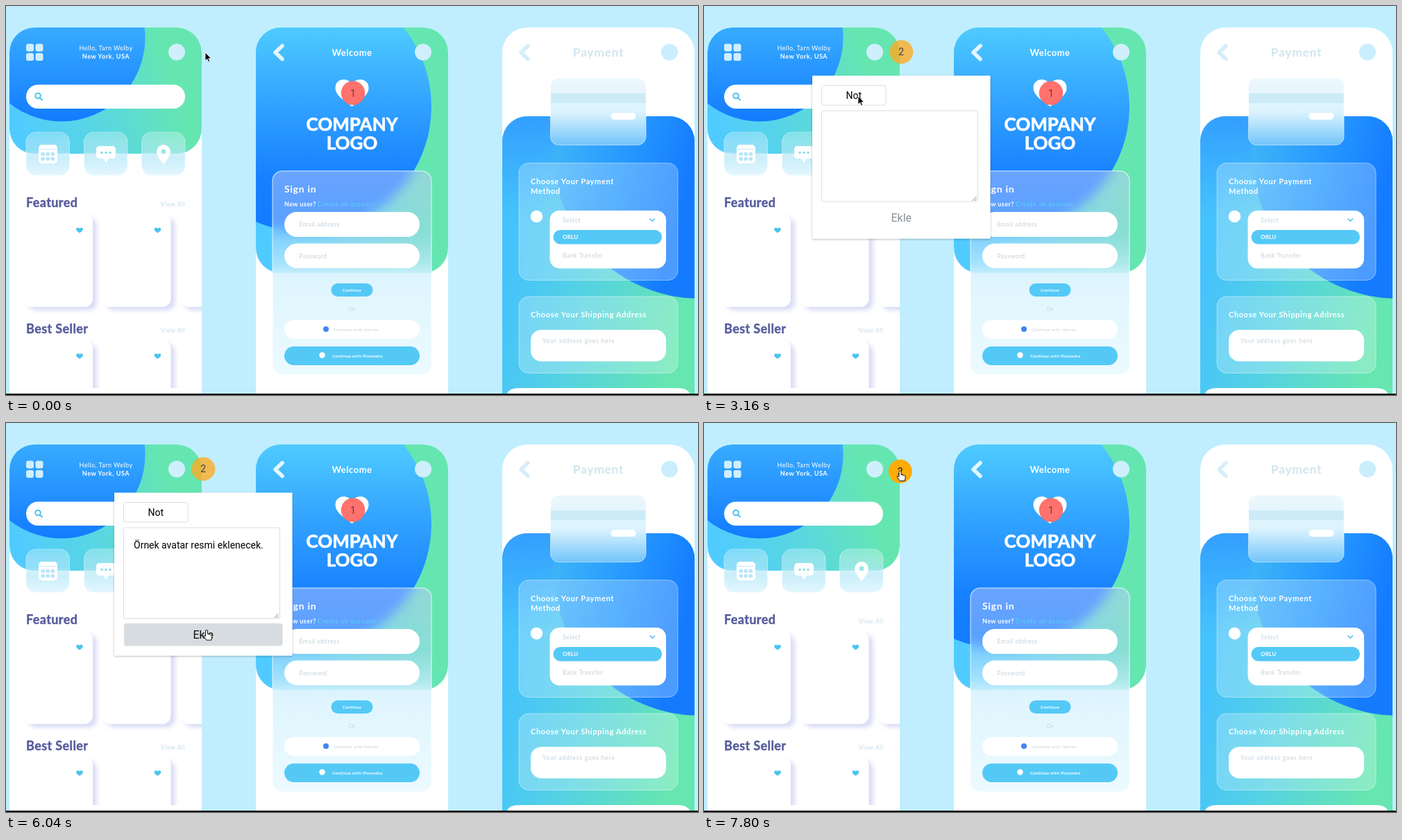
These frames come from a looping animation (997 px wide and 561 px high, 8000 ms). An HTML page:

```html
<!DOCTYPE html>
<html lang="tr">
<head>
<meta charset="utf-8">
<title>Yorum ve not ekleme</title>
<style>
html, body { margin: 0; width: 100%; height: 100%; overflow: hidden; background: #c0eefe; }
svg { display: block; width: 100vw; height: 100vh; }
text { font-family: Lato, "Open Sans", sans-serif; white-space: pre; }
.b { font-weight: 700; }
.ui text, text.ui { font-family: Roboto, Arial, sans-serif; font-size: 14px; }
.mid { text-anchor: middle; }
.head { font-size: 18px; letter-spacing: .4px; fill: #555c9c; stroke: #555c9c; stroke-width: .4; }
.link { font-size: 8.5px; letter-spacing: .6px; fill: #c3dcea; }
.hint { font-size: 8.5px; letter-spacing: .55px; fill: #c3cfd8; }
.ask { font-size: 11px; letter-spacing: .68px; fill: #fff; }
.tiny { font-size: 6.2px; letter-spacing: .25px; }
.glass { fill: #fff; fill-opacity: .24; stroke: #fff; stroke-opacity: .42; }
.white { fill: #fff; }
.pale { fill: #d0effc; }
.sky { fill: #54c9f6; }
</style>
</head>
<body>
<svg viewBox="0 0 997 561" preserveAspectRatio="none">
<defs>
  <linearGradient id="base" x1="0" x2="1" y1=".6" y2=".4">
    <stop offset="0" stop-color="#50cbff"/><stop offset=".5" stop-color="#5bd9db"/><stop offset=".85" stop-color="#65e6b1"/>
  </linearGradient>
  <linearGradient id="disc1" gradientUnits="userSpaceOnUse" x1="0" x2="0" y1="31" y2="166">
    <stop offset="0" stop-color="#38abff"/><stop offset="1" stop-color="#137bff"/>
  </linearGradient>
  <linearGradient id="disc2" gradientUnits="userSpaceOnUse" x1="0" x2="0" y1="31" y2="320">
    <stop offset="0" stop-color="#4ecbff"/><stop offset=".35" stop-color="#34a5ff"/><stop offset=".75" stop-color="#1680ff"/><stop offset="1" stop-color="#147bff"/>
  </linearGradient>
  <linearGradient id="disc3" gradientUnits="userSpaceOnUse" x1="788" x2="975" y1="240" y2="290">
    <stop offset="0" stop-color="#3db2f8"/><stop offset=".5" stop-color="#2698ff"/><stop offset="1" stop-color="#147bff"/>
  </linearGradient>
  <linearGradient id="base3" gradientUnits="userSpaceOnUse" x1="715" x2="975" y1="390" y2="450">
    <stop offset="0" stop-color="#45c2fc"/><stop offset=".45" stop-color="#55d2e2"/><stop offset="1" stop-color="#66e6b0"/>
  </linearGradient>
  <linearGradient id="fade3" gradientUnits="userSpaceOnUse" x1="0" x2="0" y1="159" y2="300">
    <stop offset="0" stop-color="#339fff"/><stop offset="1" stop-color="#339fff" stop-opacity="0"/>
  </linearGradient>
  <linearGradient id="tile" x1="0" x2="0" y1="0" y2="1">
    <stop offset="0" stop-color="#fff" stop-opacity=".24"/><stop offset=".42" stop-color="#b9eaf6" stop-opacity=".6"/>
    <stop offset=".62" stop-color="#c9eefa" stop-opacity=".95"/><stop offset="1" stop-color="#e4f7fe"/>
  </linearGradient>
  <linearGradient id="frost" gradientUnits="userSpaceOnUse" x1="0" x2="0" y1="238" y2="532">
    <stop offset="0" stop-color="#c3c8ff" stop-opacity=".48"/><stop offset=".3" stop-color="#bcd6ff" stop-opacity=".4"/>
    <stop offset=".45" stop-color="#c9ecfd" stop-opacity=".7"/><stop offset=".54" stop-color="#dff5fe"/><stop offset="1" stop-color="#ecfaff"/>
  </linearGradient>
  <linearGradient id="pay" x1="0" x2="0" y1="0" y2="1">
    <stop offset="0" stop-color="#edf8fd"/><stop offset=".5" stop-color="#dcf3fd"/>
    <stop offset=".62" stop-color="#c4e9fd"/><stop offset="1" stop-color="#72c4fb"/>
  </linearGradient>
  <filter id="blur" x="-20%" y="-20%" width="140%" height="140%"><feGaussianBlur stdDeviation="8"/></filter>
  <filter id="soft" x="-20%" y="-20%" width="150%" height="150%"><feDropShadow dx="6" dy="5" stdDeviation="3" flood-color="#d9dcf6"/></filter>
  <filter id="drop" x="-10%" y="-10%" width="120%" height="120%"><feDropShadow dx="0" dy="1" stdDeviation="1.5" flood-opacity=".3"/></filter>
  <path id="body" d="M0 559V67A36 36 0 0 1 36 31H241A36 36 0 0 1 277 67V559Z"/>
  <clipPath id="body1"><use href="#body" x="5"/></clipPath>
  <clipPath id="top1"><rect x="5" y="31" width="277" height="182" rx="36"/></clipPath>
  <clipPath id="top2"><rect x="360" y="31" width="277" height="354" rx="36"/></clipPath>
  <clipPath id="low3"><path d="M715 559V195A36 36 0 0 1 751 159H956A36 36 0 0 1 992 195V559Z"/></clipPath>
  <clipPath id="form"><rect x="384" y="238" width="229" height="294" rx="14"/></clipPath>
  <clipPath id="row"><rect x="5" y="280" width="277" height="271"/></clipPath>
  <path id="heart" d="M0 20C-8 13-24 5-24-7C-24-21-6-23 0-12C6-23 24-21 24-7C24 5 8 13 0 20Z"/>
  <path id="back" d="M5-9.500L-5 0L5 9.500" fill="none" stroke-width="5.500" stroke-linecap="round" stroke-linejoin="round"/>
</defs>

<rect width="997" height="561" fill="#c0eefe"/>

<!-- home -->
<g clip-path="url(#body1)">
  <use href="#body" x="5" class="white"/>
  <g clip-path="url(#top1)">
    <rect x="5" y="31" width="277" height="182" fill="url(#base)"/>
    <circle cx="80" cy="46" r="120.500" fill="url(#disc1)"/>
  </g>
  <g id="grid" class="pale"></g>
  <text class="mid white" x="144" y="63.500" font-size="9" letter-spacing=".45">Hello, Tarn Welby</text>
  <text class="mid white b" x="144" y="76" font-size="9" letter-spacing=".6">New York, USA</text>
  <circle class="pale" cx="246" cy="66.500" r="12"/>
  <rect class="white" x="29" y="113.500" width="229" height="34.500" rx="17"/>
  <g fill="none" stroke="#4cc3ee" stroke-width="2" stroke-linecap="round"><circle cx="46" cy="129.500" r="3.800"/><path d="M49 132.500l3 3"/></g>
  <g id="tiles" fill="url(#tile)" stroke="#fff" stroke-opacity=".4"></g>
  <rect class="white" x="47" y="200" width="27" height="27" rx="5"/>
  <path d="M49 206.500H72" stroke="#c5ebfa" stroke-width="1"/>
  <g id="days" fill="#b9e6f8"></g>
  <path class="white" d="M135 202h18q5 0 5 5v8q0 5-5 5h-5l-4 6-4-6h-5q-5 0-5-5v-8q0-5 5-5z"/>
  <g fill="#8fdce9"><circle cx="138" cy="211.500" r="1.800"/><circle cx="144" cy="211.500" r="1.800"/><circle cx="150" cy="211.500" r="1.800"/></g>
  <path class="white" fill-rule="evenodd" d="M227 228q-10-11-10-18a10 10 0 0 1 20 0q0 7-10 18zM223.500 210a3.500 3.500 0 0 0 7 0a3.500 3.500 0 0 0-7 0z"/>
  <text class="head b" x="29" y="290">Featured</text>
  <text class="link" x="223" y="289">View All</text>
  <g id="cards" class="white" clip-path="url(#row)"></g>
  <text class="head b" x="29" y="471.500">Best Seller</text>
  <text class="link" x="223" y="470.500">View All</text>
  <g id="likes" fill="#48c4ee"></g>
</g>

<!-- sign in -->
<use href="#body" x="360" class="white"/>
<g clip-path="url(#top2)">
  <rect x="360" y="31" width="277" height="354" fill="url(#base)"/>
  <circle cx="432" cy="145" r="181" fill="url(#disc2)"/>
</g>
<use href="#back" x="393" y="67" stroke="#e4f6ff"/>
<text class="mid white b" x="498.500" y="72" font-size="13" letter-spacing=".5">Welcome</text>
<circle class="pale" cx="601" cy="66.500" r="12"/>
<use href="#heart" x="498.500" y="125" class="white"/>
<g class="mid white b" font-size="26" stroke="#fff" stroke-width=".7" stroke-linejoin="round">
  <text x="498.500" y="179.500">COMPANY</text><text x="498.500" y="207">LOGO</text>
</g>
<g clip-path="url(#form)">
  <rect x="360" y="31" width="277" height="354" fill="url(#base)"/>
  <circle cx="432" cy="145" r="181" fill="url(#disc2)" filter="url(#blur)"/>
  <rect x="384" y="238" width="229" height="294" fill="url(#frost)"/>
</g>
<rect x="384" y="238" width="229" height="294" rx="14" fill="none" stroke="#fff" stroke-opacity=".55" stroke-width="1.500"/>
<text class="white b" x="401" y="269" font-size="14" letter-spacing=".7">Sign in</text>
<text class="white b" x="401" y="288.500" font-size="9" letter-spacing=".4">New user?</text>
<text x="449" y="288.500" font-size="9" letter-spacing=".7" fill="#54d8ec">Create an account</text>
<rect class="white" x="401" y="297" width="195" height="36" rx="18"/>
<rect class="white" x="401" y="342.500" width="195" height="35.500" rx="18"/>
<text class="hint" x="422.500" y="318">Email address</text>
<text class="hint" x="422.500" y="363.500">Password</text>
<rect class="sky" x="468.500" y="400" width="60" height="19" rx="9.500"/>
<text class="tiny mid white b" x="498.500" y="412">Continue</text>
<text class="mid" x="498.500" y="440" font-size="8" fill="#c3d3dc">Or</text>
<rect class="white" x="401" y="453" width="195" height="27" rx="13.500"/>
<circle cx="461" cy="466" r="4" fill="#4285f4"/>
<text class="tiny" x="472" y="468.500" fill="#c6d0d8">Continue with Norvex</text>
<rect class="sky" x="401" y="491" width="195" height="27" rx="13.500"/>
<circle class="white" cx="455.500" cy="503.500" r="4.200"/>
<text class="tiny white b" x="470" y="506.500">Continue with Plumedra</text>

<!-- payment -->
<use href="#body" x="715" class="white"/>
<use href="#back" x="747" y="67" stroke="#d6eefa"/>
<text class="mid b" x="853.500" y="73" font-size="17.500" letter-spacing=".7" fill="#d0e6ee">Payment</text>
<circle cx="956" cy="66.500" r="12" fill="#caeefc"/>
<g clip-path="url(#low3)">
  <rect x="715" y="159" width="277" height="400" fill="url(#base3)"/>
  <rect x="715" y="159" width="277" height="141" fill="url(#fade3)"/>
  <circle cx="1000" cy="210" r="212" fill="url(#disc3)"/>
</g>
<rect x="784.500" y="104" width="137.500" height="96.500" rx="12" fill="url(#pay)" stroke="#fff" stroke-opacity=".5"/>
<rect x="785" y="126" width="136.500" height="14" fill="#cdebf7"/>
<rect class="white" x="871.500" y="154" width="36" height="10" rx="5"/>
<rect class="glass" x="739" y="226.500" width="229" height="169" rx="14"/>
<text class="ask b" x="756" y="257">Choose Your Payment</text>
<text class="ask b" x="756" y="270.500">Method</text>
<circle class="white" cx="764.500" cy="303.500" r="8.700"/>
<rect class="white" x="783.500" y="295" width="167.500" height="83.500" rx="14"/>
<text class="hint" x="802" y="311.500">Select</text>
<path d="M927.500 306.500l3.700 3.700 3.700-3.700" fill="none" stroke="#4cbce8" stroke-width="1.500"/>
<rect class="sky" x="788.500" y="323" width="156.500" height="20.500" rx="10"/>
<text class="white b" x="802" y="336.300" font-size="8" letter-spacing=".2">ORLU</text>
<text class="hint" x="802" y="363">Bank Transfer</text>
<rect class="glass" x="739" y="419" width="229" height="110.500" rx="14"/>
<text class="ask b" x="756" y="449">Choose Your Shipping Address</text>
<rect class="white" x="756" y="467" width="195" height="45.500" rx="15"/>
<text class="hint" x="773" y="485.500" letter-spacing=".85" style="letter-spacing:.85px">Your address goes here</text>
<path class="white" d="M722 559q3-8 17-8H968q14 0 17 8z"/>
<rect y="559" width="997" height="2" fill="#0b0f12"/>

<!-- comment layer -->
<g class="ui">
  <g transform="translate(500 125.500)" opacity=".95"><circle r="17.300" fill="#ff6b66"/><text class="mid" y="5" fill="#6b2e30">1</text></g>
  <g id="pin"><circle r="17" id="dot"/><text class="mid" y="5" fill="#111">2</text></g>
  <g id="popup">
    <rect class="white" x="156" y="100.500" width="256.500" height="235" filter="url(#drop)"/>
    <rect x="169.500" y="114.500" width="92.500" height="28.500" rx="3" fill="#fff" stroke="#d9dcdf"/>
    <text class="mid" id="kind" x="215.800" y="134"></text>
    <rect x="169.500" y="151" width="225" height="131" rx="2" fill="#fff" stroke="#d9dcdf"/>
    <path d="M386.500 281l6-6M390 281l2.500-2.500" stroke="#666" stroke-width=".8"/>
    <text id="note" x="184" y="180.500"></text>
    <rect id="caret" y="167.500" width="1" height="16" fill="#111"/>
    <path id="edges" d="M171 291V312M397.500 291V312" stroke="#e9ebec"/>
    <rect id="hover" x="170" y="289" width="228.500" height="32.500" rx="4" fill="#d6dcdf"/>
    <text class="mid" id="add" x="284.300" y="310.500" style="font-size:16px">Ekle</text>
  </g>
  <g id="tip"><rect width="174" height="27" rx="3" fill="#68747f" fill-opacity=".84"/><text x="4" y="18.500" class="white">Yorum Yazmak için tıklayın.</text></g>
  <g id="mouse">
    <path id="arrow" d="M0 0v12l2.800-2.600 1.800 4.200 2-.9-1.800-4h3.800z" fill="#000" stroke="#fff" stroke-width=".8"/>
    <path id="cross" d="M-6 0H6M0-6V6" stroke="#111" stroke-width="1.200"/>
    <path id="beam" d="M-2.500-6.500Q0-6.500 0-5Q0-6.500 2.500-6.500M0-5V5M-2.500 6.500Q0 6.500 0 5Q0 6.500 2.500 6.500M-1.500 2H1.500" fill="none" stroke="#111" stroke-width="1.200"/>
    <path id="hand" d="M-1.500 1a1.500 1.500 0 0 1 3 0v4l4.500 1q2 .6 1.700 2.600l-.8 5.400h-7l-4-5.400q-.6-1.600 1-1.600l1.600 1.400z" fill="#fff" stroke="#111" stroke-width="1"/>
  </g>
</g>
</svg>
<script>
const $ = id => document.getElementById(id);
const LOOP = 8000, NOTE = "Örnek avatar resmi eklenecek.";

function fill(id, xs, ys, shape) {
  $(id).innerHTML = ys.flatMap(y => xs.map(x => shape(x, y))).join("");
}
const box = (w, h, r, extra = "") => (x, y) =>
  `<rect x="${x}" y="${y}" width="${w}" height="${h}" rx="${r}" ${extra}/>`;

fill("grid", [29, 42.5], [54.5, 68], box(11, 11, 3));
fill("tiles", [29, 112.500, 195.500], [182], box(62.500, 62.500, 14));
fill("days", [50.500, 57.500, 64.500], [211, 218], box(5.500, 5, 1.500));
fill("cards", [26, 138.500, 251], [300, 482], box(99, 134, 12, 'filter="url(#soft)"'));
fill("likes", [106, 218.500], [323.500, 505],
  (x, y) => `<use href="#heart" transform="translate(${x} ${y}) scale(.2)"/>`);

// time, x, y, smooth arrival
const path = [
  [0, 287, 67], [120, 287, 67], [560, 273, 66.500, 1], [1800, 273, 66.500],
  [2160, 274, 117, 1], [2300, 274, 117], [2720, 222, 130, 1], [3360, 222, 130],
  [3760, 240.500, 179, 1], [5640, 240.500, 179], [5960, 289, 297, 1], [6190, 289, 303],
  [6480, 285, 182], [6760, 284, 67], [7360, 284, 66], [7640, 282.500, 69.500, 1], [LOOP, 282.500, 69.500]
];

function mouseAt(t) {
  const i = Math.max(1, path.findIndex(p => p[0] >= t));
  const [t0, x0, y0] = path[i - 1], [t1, x1, y1, smooth] = path[i];
  let k = Math.max(0, (t - t0) / (t1 - t0));
  if (smooth) k = k * k * (3 - 2 * k);
  return [x0 + (x1 - x0) * k, y0 + (y1 - y0) * k];
}

const OPEN = 1600, PICK = 3120, FOCUS = 4100, BLINK = 4600, TYPE = 4800, TYPED = 5580, CLOSE = 6160;
const show = (id, on) => $(id).style.display = on ? "" : "none";
const place = (id, x, y) => $(id).setAttribute("transform", `translate(${x} ${y})`);
const label = (id, s) => { if ($(id).textContent !== s) $(id).textContent = s; };

function draw(t) {
  const [mx, my] = mouseAt(t);
  const open = t >= OPEN && t < CLOSE;
  const overPin = t > CLOSE && Math.hypot(mx - 284, my - 66) < 17;

  const drag = Math.min(1, Math.max(0, (t - 7360) / 280)), ease = drag * drag * (3 - 2 * drag);
  show("pin", t >= OPEN);
  place("pin", 284.300 - 1.500 * ease, 66.300 + 3.500 * ease);
  $("pin").setAttribute("opacity", overPin ? 1 : t < PICK ? .85 : .78);
  $("dot").setAttribute("fill", t < PICK ? "#fb5c5c" : overPin ? "#ffab08" : "#ffab20");

  show("popup", open);
  label("kind", t < PICK ? "Yorum" : "Not");
  const n = Math.ceil(NOTE.length * Math.min(1, Math.max(0, (t - TYPE) / (TYPED - TYPE))));
  label("note", NOTE.slice(0, n));
  const end = open && n ? $("note").getComputedTextLength() : 0;
  $("caret").setAttribute("x", 184.500 + end);
  show("caret", (t >= FOCUS && t < BLINK) || (t >= TYPE && t < 5900));
  show("edges", t < 2700);
  const overAdd = my > 289 && t > TYPED && open;
  show("hover", overAdd);
  $("add").setAttribute("fill", n ? "#111" : "#8b9095");

  let kind = "arrow";
  if (overPin || overAdd) kind = "hand";
  else if (t >= 320 && !open) kind = "cross";
  else if (open && my > 151 && my < 282) kind = "beam";
  for (const k of ["arrow", "cross", "beam", "hand"]) show(k, k === kind);
  show("mouse", t < TYPE || t >= 5640);
  place("mouse", mx, my);

  const [tx, ty] = mouseAt(t - 30);
  show("tip", kind === "cross");
  place("tip", tx + 18.300, ty - 13.800);
}

function tick() {
  draw(performance.now() % LOOP);
  requestAnimationFrame(tick);
}
tick();
</script>
</body>
</html>
```
